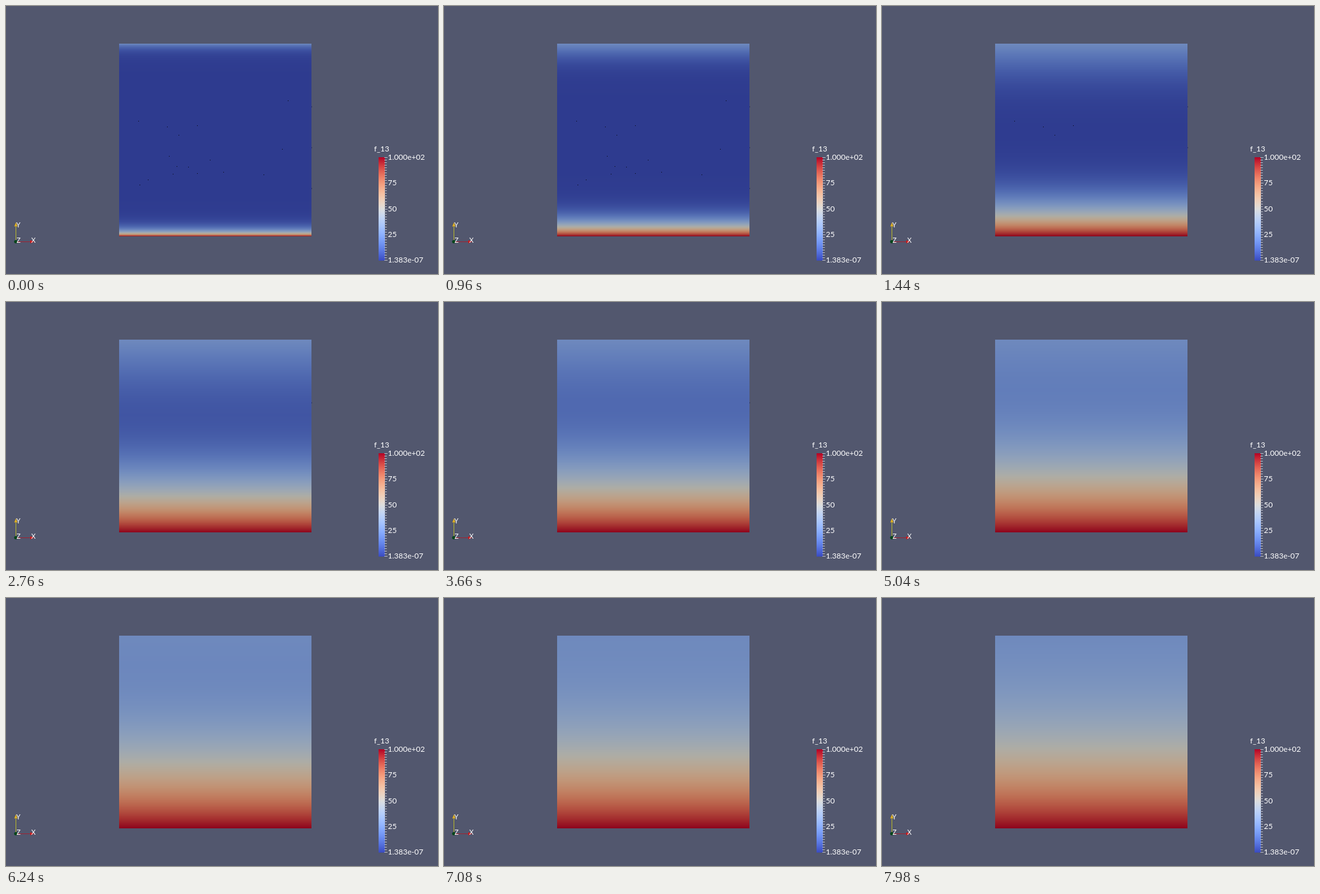
An HTML page with a canvas for the animation above (8000 ms loop, 676x420 px).

```html
<!DOCTYPE html>
<html lang="en">
<head>
<meta charset="utf-8">
<title>Heat diffusion</title>
<style>
  html, body { margin: 0; width: 100%; height: 100%; overflow: hidden; background: #52576e; }
  canvas { display: block; }
</style>
</head>
<body>
<canvas id="stage" width="676" height="420"></canvas>
<script>
const ctx = document.getElementById('stage').getContext('2d');
const BACK = '#52576e';
const LOOP = 8000, HOLD = 900, STEP = 60;
const plate = { x: 177, y: 59, w: 301, h: 302 };
const bar = { x: 583, y: 237, w: 10, h: 162 };

const COLD = [59, 76, 192], COOL = [141, 176, 254], NEUTRAL = [221, 221, 221];
const WARM = [244, 154, 123], HOT = [180, 4, 38];
const PLAIN = [1, 1, 1], SHADE = [0.785, 0.78, 0.745];

// Cool-to-warm map: a parabola per channel through three colours of each half.
function colour(value, light) {
  const v = Math.min(Math.max(value, 0), 1);
  const [a, b, c] = v < 0.5 ? [COLD, COOL, NEUTRAL] : [NEUTRAL, WARM, HOT];
  const u = v < 0.5 ? v * 2 : v * 2 - 1;
  const rgb = light.map((gain, k) => Math.round(gain * (
    a[k] * (1 - u) * (1 - 2 * u) + b[k] * 4 * u * (1 - u) + c[k] * u * (2 * u - 1))));
  return `rgb(${rgb})`;
}

function rect(fill, x, y, w, h) {
  ctx.fillStyle = fill;
  ctx.fillRect(x, y, w, h);
}

function label(text, x, y, size = 12) {
  ctx.font = `${size}px Lato, sans-serif`;
  ctx.fillStyle = '#fff';
  ctx.fillText(text, x, y);
}

function drawLegend() {
  for (let y = 0; y < bar.h; y++) {
    rect(colour(1 - y / (bar.h - 1), PLAIN), bar.x, bar.y + y, bar.w, 1);
  }
  for (let i = 0; i <= 40; i++) {
    const length = i % 10 ? 4 : 5;
    rect('#b4b6c2', bar.x + bar.w - 1, Math.round(bar.y + i * 4.03), length, 1);
  }
  label('f_13', 576, 227.5);
  ['1.000e+02', '75', '50', '25', '1.383e-07'].forEach((text, i) =>
    label(text, 597.5, 241 + i * 40.25));
}

function triangle(fill, ...points) {
  ctx.fillStyle = fill;
  ctx.beginPath();
  for (let i = 0; i < points.length; i += 2) ctx.lineTo(points[i], points[i + 1]);
  ctx.fill();
}

function drawAxes() {
  rect('#b4b42c', 15, 346, 1, 22);
  rect('#9c2434', 17, 369, 22, 1);
  triangle('#e0b020', 15.5, 339, 18, 345.5, 13, 345.5);
  triangle('#d01818', 44, 369.5, 38, 367, 38, 372);
  ctx.fillStyle = '#06451c';
  ctx.beginPath();
  ctx.arc(15.3, 369.3, 2.6, 0, 7);
  ctx.fill();
  label('Y', 16, 347, 10.5);
  label('X', 39.5, 370.5, 10.5);
  label('Z', 16.5, 370.5, 10.5);
}

// Heat equation, 100 at the bottom and 25 at the top, advanced by implicit steps.
const DT = 0.0006, MODES = 200;
function profile(steps) {
  const weights = [];
  for (let n = 1; n <= MODES; n++) {
    const start = 2 / (n * Math.PI) * (100 - (n % 2 ? -25 : 25));
    const w = start / (1 + (n * Math.PI) ** 2 * DT) ** steps;
    if (Math.abs(w) < 1e-5) break;
    weights.push(w);
  }
  return s => weights.reduce(
    (u, w, i) => u - w * Math.sin((i + 1) * Math.PI * s), 100 - 75 * s);
}

function seeded(seed) {
  return () => (seed = seed * 16807 % 2147483647) / 2147483647;
}

// Scattered mesh points that stay dark until warmth reaches them.
const random = seeded(1383);
const specks = Array.from({ length: 16 }, () => ({
  x: Math.floor(plate.x + plate.w * (0.1 + 0.8 * random())),
  row: Math.floor(plate.h * (0.23 + 0.55 * random()))
}));

function drawPlate(frame) {
  const heat = profile(2 * frame + 1);
  const rows = [];
  rect(BACK, plate.x + plate.w, plate.y, 2, plate.h);
  for (let y = 0; y < plate.h; y++) {
    rows[y] = heat(1 - (y + 0.5) / plate.h);
    rect(colour(rows[y] / 100, SHADE), plate.x, plate.y + y, plate.w, 1);
  }
  for (const { x, row } of specks) {
    if (rows[row] < 0.4) rect('#090b16', x, plate.y + row, 1, 1);
  }
  // Notches on the right edge close from the bottom up.
  for (let i = 0; i < 3; i++) {
    if (frame < 60 * 0.4 ** i) rect('#343a5c', plate.x + plate.w, 157 + 64 * i, 1, 2);
  }
}

rect(BACK, 0, 0, 676, 420);
drawLegend();
drawAxes();

let shown = -1;
const began = performance.now();
function tick() {
  const t = (performance.now() - began) % LOOP;
  const frame = t < HOLD ? 0 : Math.floor((t - HOLD) / STEP) + 1;
  if (frame !== shown) drawPlate(shown = frame);
  requestAnimationFrame(tick);
}
tick();
</script>
</body>
</html>
```
